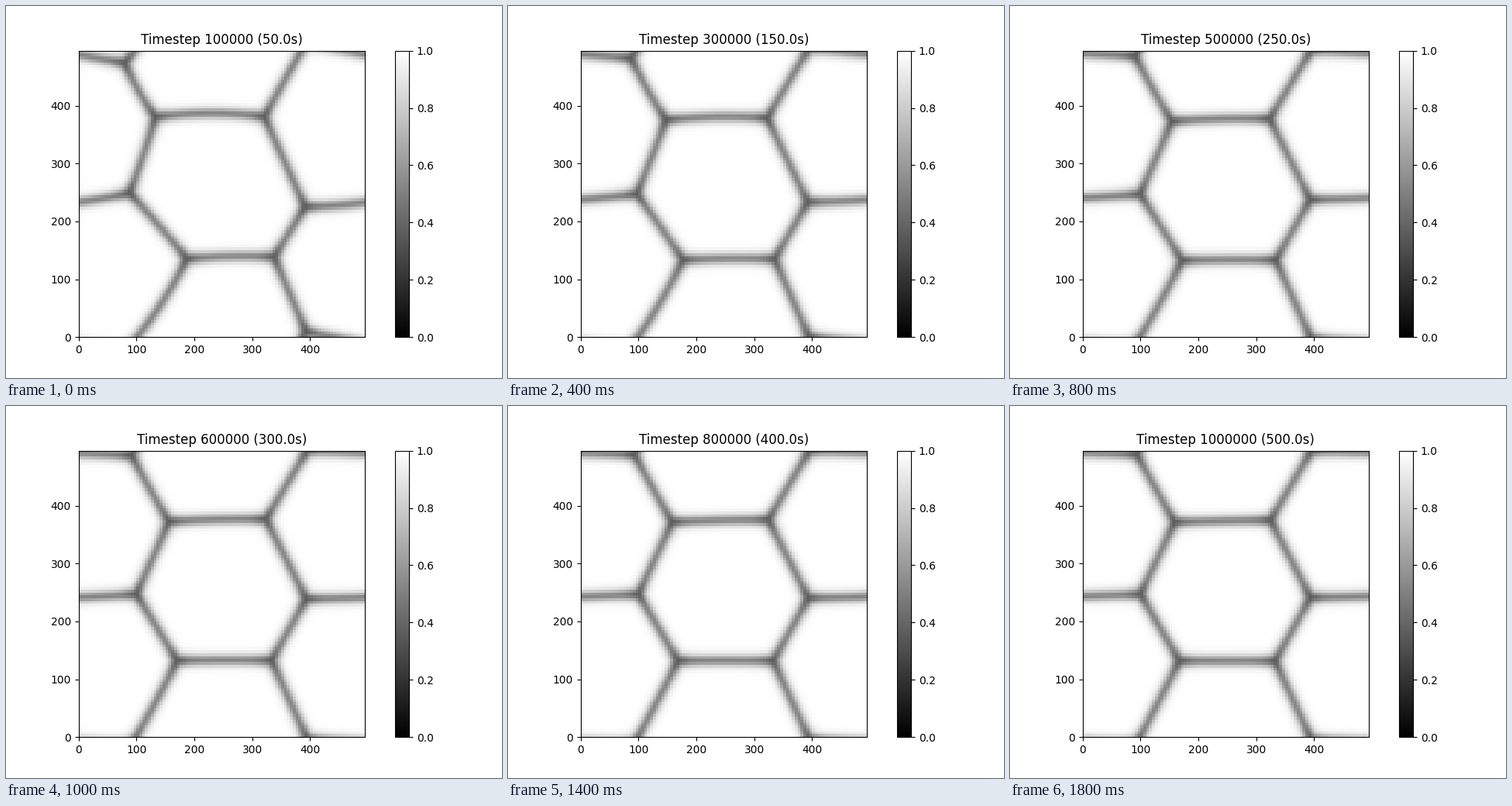
Write a matplotlib script that moves like this. It is 640 px wide and 480 px high and loops after 2 s.

```python
import numpy as np
import matplotlib.pyplot as plt
from matplotlib.animation import FuncAnimation

FRAMES, INTERVAL = 10, 200
PERIOD = 500.0   # size of the periodic domain
CELL = 5.0
WIDTH = 9.0      # half thickness of a grain boundary
DEPTH = 0.95     # darkness of the boundaries
BOW_TIME = 4.0   # steps in which curved boundaries straighten

# Triple junctions: start, resting place and relaxation time in steps.
JUNCTIONS = {
    "A": ((79.5, 474), (94, 490), 2.9),
    "B": ((133, 380.5), (160, 371), 2.6),
    "C": ((321, 381), (326, 373), 6),
    "D": ((88, 249), (100, 247), 1.4),
    "E": ((391.5, 225), (394, 242), 3),
    "F": ((187, 135.5), (166, 131.5), 3),
    "G": ((338, 138.5), (332.5, 131), 3.2),
    "H": ((393, 9.5), (395.5, -5), 1.8),
}

# Initial bow of the curved boundaries, positive to the left of travel.
BOW = {"BC": 6, "FG": 2.5, "FA": 6.5, "DE": 5, "AH": 1,
       "AB": -3, "DB": -1.5, "DF": 1.5}

# Each grain: its corners with their periodic shift.
GRAINS = [
    [("B", 0, 0), ("C", 0, 0), ("E", 0, 0), ("G", 0, 0), ("F", 0, 0), ("D", 0, 0)],
    [("A", 0, 0), ("B", 0, 0), ("D", 0, 0), ("E", -1, 0), ("C", -1, 0), ("H", -1, 1)],
    [("D", 0, 0), ("F", 0, 0), ("A", 0, -1), ("H", -1, 0), ("G", -1, 0), ("E", -1, 0)],
    [("A", 0, 0), ("B", 0, 0), ("C", 0, 0), ("H", 0, 1), ("G", 0, 1), ("F", 0, 1)],
]

edges = np.arange(100) * CELL
centres = edges[:-1] + CELL / 2
X, Y = np.meshgrid(centres, centres)
POINTS = np.stack([X.ravel(), Y.ravel()], axis=1)


def junction(name, sx, sy, step):
    """Position of a junction, relaxing exponentially to rest."""
    start, rest, time = JUNCTIONS[name]
    start, rest = np.array(start), np.array(rest)
    return rest + (start - rest) * np.exp(-step / time) + PERIOD * np.array([sx, sy])


def outline(grain, step, parts=8):
    """Closed outline of a grain, with its curved sides sampled."""
    t = np.arange(parts)[:, None] / parts
    fade = np.exp(-step / BOW_TIME)
    sides = []
    for a, b in zip(grain, grain[1:] + grain[:1]):
        p, q = junction(*a, step), junction(*b, step)
        bow = BOW.get(a[0] + b[0], -BOW.get(b[0] + a[0], 0)) * fade
        d = q - p
        normal = np.array([-d[1], d[0]]) / np.hypot(*d)
        sides.append(p + d * t + normal * bow * 4 * t * (1 - t))
    return np.concatenate(sides)


def signed_distance(poly):
    """Distance to the outline, positive inside, with periodic wrapping."""
    mid = poly.mean(axis=0)
    pts = (POINTS - mid + PERIOD / 2) % PERIOD - PERIOD / 2 + mid
    px, py = pts[:, :1], pts[:, 1:]
    (x0, y0), (x1, y1) = poly.T, np.roll(poly, -1, axis=0).T
    dx, dy = x1 - x0, y1 - y0
    t = np.clip(((px - x0) * dx + (py - y0) * dy) / (dx**2 + dy**2), 0, 1)
    dist = np.hypot(px - x0 - t * dx, py - y0 - t * dy).min(axis=1)
    rise = np.where(dy == 0, 1e-9, dy)
    hits = ((y0 > py) != (y1 > py)) & (px < x0 + (py - y0) * dx / rise)
    return np.where(hits.sum(axis=1) % 2 == 1, dist, -dist)


def field(step):
    """Sum of squared order parameters, low along the boundaries."""
    s = np.array([signed_distance(outline(g, step)) for g in GRAINS]) / WIDTH
    phi = np.exp(s - s.max(axis=0))
    phi /= phi.sum(axis=0)
    return (1 - DEPTH * (1 - (phi**2).sum(axis=0))).reshape(X.shape)


fig, ax = plt.subplots(figsize=(6.4, 4.8), dpi=100)
mesh = ax.pcolormesh(edges, edges, field(0), cmap="gray", vmin=0, vmax=1)
fig.colorbar(mesh, ax=ax)
ax.set_aspect("equal")
ax.set_anchor("C")
title = ax.set_title("")


def update(step):
    mesh.set_array(field(step))
    count = (step + 1) * 100000
    title.set_text(f"Timestep {count} ({count / 2000:.1f}s)")
    return mesh, title


anim = FuncAnimation(fig, update, frames=FRAMES, interval=INTERVAL,
                     repeat=True, repeat_delay=0)
plt.show()
```
